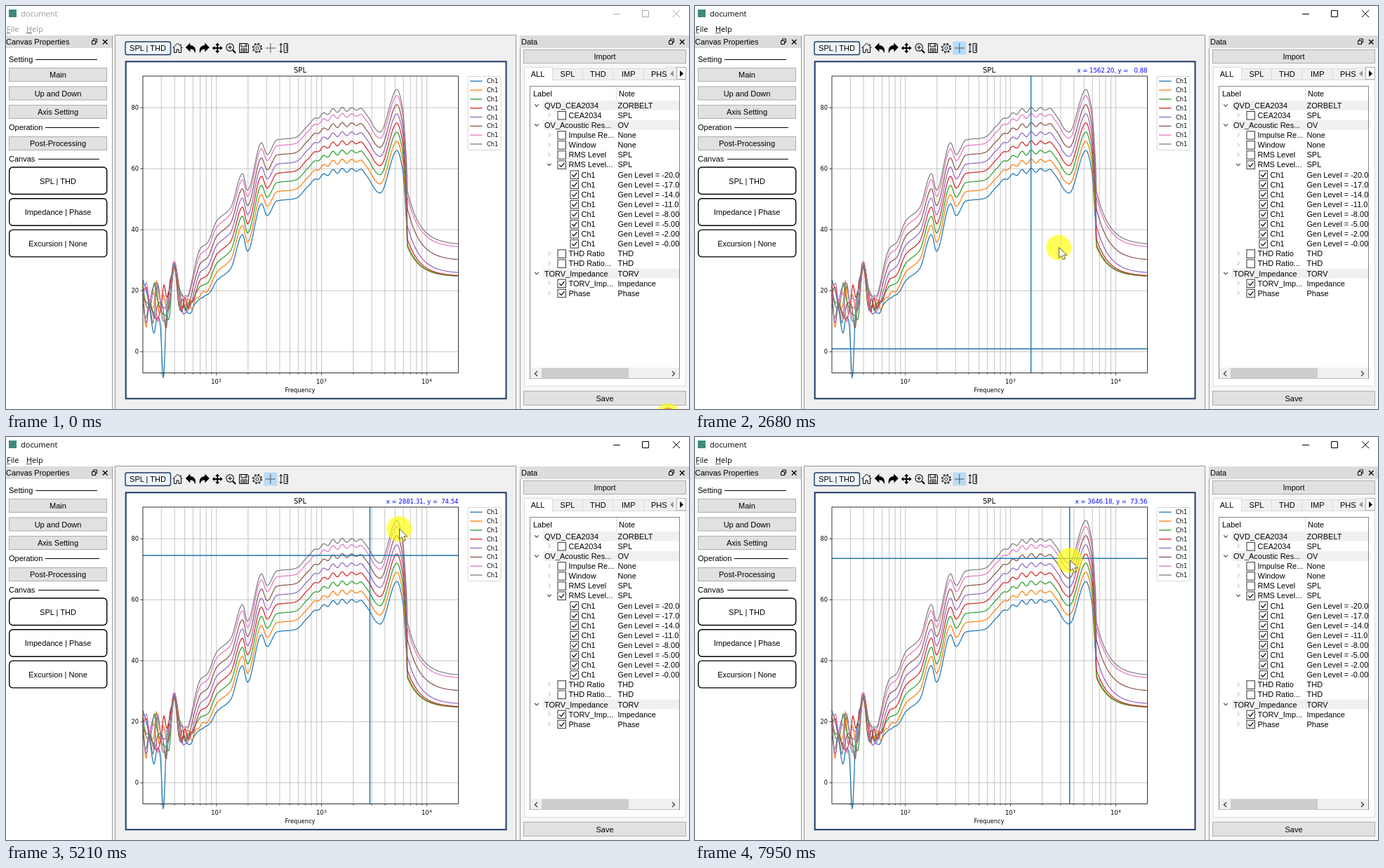
These frames come from a looping animation (973 by 575 pixels, 8 s). An HTML page:

```html
<!DOCTYPE html>
<html lang="en">
<head>
<meta charset="utf-8">
<title>document</title>
<style>
html, body { margin: 0; width: 100%; height: 100%; overflow: hidden; background: #fff; }
svg { display: block; }
text { font: 11px "Liberation Sans", Arial, sans-serif; fill: #000; white-space: pre; }
.win { font: 11px "Open Sans", sans-serif; fill: inherit; }
.plot { font: 8.3px "DejaVu Sans", sans-serif; }
.mid { text-anchor: middle; }
.end { text-anchor: end; }
</style>
</head>
<body>
<svg id="stage" width="973" height="575" viewBox="0 0 973 575"></svg>
<script>
const LOOP = 8000;
const AX = { l: 195, r: 644.5, t: 100, b: 523.5 };
const COLORS = ['#1f77b4', '#ff7f0e', '#2ca02c', '#d62728', '#9467bd', '#8c564b', '#e377c2', '#7f7f7f'];
const DB = 4.35;
const xPos = f => AX.l + Math.log10(f / 20) * (AX.r - AX.l) / 3;
const yPos = v => 493.2 - v * DB;
const drop = i => Math.max(0, 20 - 3 * i); // level below full scale, dB

const rect = (x, y, w, h, fill, stroke = 'none', more = '') =>
  `<rect x="${x}" y="${y}" width="${w}" height="${h}" fill="${fill}" stroke="${stroke}" ${more}/>`;
const line = (x1, y1, x2, y2, stroke = '#000', w = 1) =>
  `<path d="M${x1} ${y1}L${x2} ${y2}" stroke="${stroke}" stroke-width="${w}"/>`;
const text = (x, y, s, cls = '', more = '') => `<text x="${x}" y="${y}" class="${cls}" ${more}>${s}</text>`;
const path = (d, w = 1, stroke = '#000', fill = 'none') =>
  `<path d="${d}" fill="${fill}" stroke="${stroke}" stroke-width="${w}"/>`;
const at = (x, y, s) => `<g transform="translate(${x} ${y})">${s}</g>`;
const button = (x, y, w, h, s) =>
  rect(x + .5, y + .5, w - 1, h - 1, '#e1e1e1', '#adadad') + text(x + w / 2, y + h / 2 + 4.2, s, 'mid');

// Window frame
function windowBar() {
  return `<g id="bar">${text(21, 15, 'document', 'win')}${text(1, 37, 'File', 'win')}${text(29, 37, 'Help', 'win')}</g>
    <g id="ctl" fill="none">${path('M865 11.5h10M906.5 6.5h9v9h-9zM950 6l10 10M960 6l-10 10', 1, 'inherit')}</g>`
    + rect(4, 5, 11, 11, '#3f8a7c') + line(1, 38.5, 6, 38.5, '#555') + line(29, 38.5, 37, 38.5, '#555');
}

function dockHead(x, w, s) {
  const r = x + w;
  return rect(x, 42, w, 18, '#dcdcdc') + text(x + (x ? 2 : 0), 55, s)
    + path(`M${r - 28.5} 49.5h5v5h-5zM${r - 26.5} 49v-2h5v5h-2`)
    + path(`M${r - 13} 48l6.5 6.5m0-6.5l-6.5 6.5`, 1.4);
}

function leftPanel() {
  let s = dockHead(0, 151, 'Canvas Properties');
  [['Setting', 76, 42, 130], ['Operation', 173, 56, 133], ['Canvas', 218, 46, 133]].forEach(([n, y, a, b]) => {
    s += text(4, y + 4, n) + line(a, y + .5, b, y + .5, '#000', 1.2);
  });
  [['Main', 88], ['Up and Down', 114.5], ['Axis Setting', 141], ['Post-Processing', 186]].forEach(([n, y]) => {
    s += button(4, y, 140, 20, n);
  });
  ['SPL | THD', 'Impedance | Phase', 'Excursion | None'].forEach((n, i) => {
    const y = 230 + i * 44.7;
    s += rect(4.7, y, 139, 38.5, '#fff', '#000', 'rx="5" stroke-width="1.4"') + text(74, y + 23.7, n, 'mid');
  });
  return s;
}

// Toolbar
function toolbar() {
  const turn = 'M-7.5 -1L-1 -7.5V-4C5 -4 8 1 6 7.5C5 3 3 1.5 -1 1.5V5.5Z';
  const move = 'M0 -7.5L3 -4H1V-1H4V-3L7.5 0L4 3V1H1V4H3L0 7.5L-3 4H-1V1H-4V3L-7.5 0L-4 -3V-1H-1V-4H-3Z';
  const ring = (r, more = '') => `<circle r="${r}" fill="none" stroke="#222" ${more}/>`;
  const icons = [
    path('M-7 0L0 -7L7 0M-5 -1.5V6.5H-1.5V2H1.5V6.5H5V-1.5M4.5 -3V-6'),
    path(turn, 0, 'none', '#000'),
    `<g transform="scale(-1 1)">${path(turn, 0, 'none', '#000')}</g>`,
    path(move, 0, 'none', '#000'),
    at(-1, -1, ring(5.3, 'stroke-width="1.2"') + path('M-3 0H3M0 -3V3') + path('M4 4L8 8', 2)),
    path('M-6.5 -6.5H5L6.5 -5V6.5H-6.5ZM-4 -6.5V-2H4V-6.5M-4 6.5V1H4V6.5M-2.5 3H2.5M-2.5 4.8H2.5M2 -5.5V-3'),
    ring(5) + ring(6.4, 'stroke-width="1.6" stroke-dasharray="2.5 2.53"') + ring(2.1),
    '<rect id="hot" x="-9.5" y="-9.5" width="19" height="19" fill="#b9dcf5"/>' + path('M-7 0H7M0 -7V7', 1, '#555'),
    path('M-4 -6V6M-6 -4L-4 -6.5L-2 -4M-6 4L-4 6.5L-2 4M.5 -6.5H5.5V6.5H.5ZM3 -4H5.5M3 -1.5H5.5M3 1H5.5M3 3.5H5.5')
  ];
  return rect(170, 51, 64.5, 18.5, '#eef5fb', '#1c3a63', 'rx="2.5" stroke-width="1.4"')
    + text(202, 64, 'SPL | THD', 'mid') + icons.map((s, i) => at(244.5 + i * 18.9, 60, s)).join('');
}

// Curves: turning points of the loudest sweep
const SHAPE = [[195, 600], [258, 425], [277, 346], [287, 338], [300, 307], [320, 288], [337, 239], [344, 263],
  [364, 195], [372, 212], [386, 191], [411, 188], [440, 161], [475, 148], [505, 147], [533, 180],
  [557, 119], [565, 146], [571, 228]];

const bump = (x, mid, w) => Math.exp(-(((x - mid) / w) ** 2));
const sigmoid = u => 1 / (1 + Math.exp(-u));
const powerSum = (a, b, k = 18.9) => Math.min(a, b) - k * Math.log1p(Math.exp(-Math.abs(a - b) / k));

// Cubic through the points that never overshoots
function spline(p, x) {
  const k = Math.max(0, p.findIndex(q => q[0] >= x) - 1);
  const sec = j => p[j + 1] && p[j] ? (p[j + 1][1] - p[j][1]) / (p[j + 1][0] - p[j][0]) : sec(j < 0 ? 0 : j - 1);
  const slope = j => {
    const a = sec(j - 1), b = sec(j);
    return a * b <= 0 ? 0 : 2 * a * b / (a + b);
  };
  const h = p[k + 1][0] - p[k][0], u = (x - p[k][0]) / h, v = 1 - u;
  return p[k][1] * v * v * (1 + 2 * u) + p[k + 1][1] * u * u * (3 - 2 * u)
    + h * u * v * (slope(k) * v - slope(k + 1) * u);
}

function random(seed) {
  return () => (seed = (seed * 16807) % 2147483647) / 2147483647;
}

function noiseKnots(seed) {
  const rnd = random(seed), knots = [];
  for (let x = 195; x < 360; x += 4 + rnd() * 2.5) knots.push([x, rnd() - .5]);
  return knots;
}

function curve(i) {
  const knots = noiseKnots(977 + i * 7919);
  const end = 386 - 46 * sigmoid((i - 5) * 2.2);
  const top = 356 - 73 * sigmoid((i - 4.6) * 1.3);
  const d = [];
  for (let x = AX.l; x <= AX.r; x += 1.2) {
    let y;
    if (x > 571.5) y = end + (top - end) * Math.exp((578 - x) / 18);
    else {
      const ripple = 3.5 * bump(x, 472, 32) * Math.cos((x - 452) / 13.5 * 2 * Math.PI);
      y = spline(SHAPE, x) + drop(i) * DB - ripple;
    }
    if (x < 345) {
      const peak = bump(x, 240, 5.5);
      const amp = 80 * Math.exp(-Math.max(0, x - 225) / 35) * (1 - .75 * peak);
      const dip = i ? 0 : 75 * bump(x, 224, 3);
      const floor = 430 - 62 * peak + dip + spline(knots, x) * amp + Math.max(0, x - 290);
      y = powerSum(y, floor);
    }
    d.push(x.toFixed(1) + ' ' + y.toFixed(1));
  }
  return 'M' + d.join('L');
}

function chart() {
  let s = rect(170.7, 79.3, 541.8, 480.9, '#fff', '#1c3a63', 'stroke-width="2"');
  for (let dec = 10; dec <= 10000; dec *= 10)
    for (let n = 1; n < 10; n++) {
      const f = dec * n, x = xPos(f);
      if (f <= 20 || f >= 20000) continue;
      s += line(x, AX.t, x, AX.b, '#b0b0b0', .75) + line(x, AX.b, x, AX.b + (n === 1 ? 3.5 : 2), '#000', .7);
      if (n === 1) s += text(x - 7.5, 539, '10', 'plot') + text(x + 3.5, 535.5, Math.log10(f), 'plot', 'style="font-size:5.8px"');
    }
  for (let v = 0; v <= 80; v += 20)
    s += line(AX.l, yPos(v), AX.r, yPos(v), '#b0b0b0', .75) + line(AX.l - 3.5, yPos(v), AX.l, yPos(v), '#000', .8)
      + text(189, yPos(v) + 3.2, v, 'plot end');
  s += '<g stroke-linejoin="round">' + COLORS.map((c, i) => path(curve(i), 1.25, c)).join('') + '</g>';
  s += `<g id="cross"><path id="hair" stroke="#1f77b4" stroke-width="1.5"/>
    ${text(644.5, 95.3, '', 'plot end', 'id="read" style="font-size:8.5px;fill:#00f"')}</g>`;
  s += rect(AX.l, AX.t, AX.r - AX.l, AX.b - AX.t, 'none', '#000', 'stroke-width=".8"');
  s += text(419, 94.5, 'SPL', 'plot mid', 'style="font-size:10px"') + text(419, 551, 'Frequency', 'plot mid');
  s += rect(658, 100.5, 47, 105, '#fff', '#ccc', 'rx="2" stroke-width=".8"');
  COLORS.forEach((c, i) => {
    const y = 107.2 + i * 12.83;
    s += line(661, y, 678.5, y, c, 1.3) + text(685, y + 3, 'Ch1', 'plot');
  });
  return s;
}

// Data dock; rows are depth, label, note, box state (- none, 0 off, 1 on), open
const ROWS = [
  [0, 'QVD_CEA2034', 'ZORBELT', '-', 1], [1, 'CEA2034', 'SPL', 0],
  [0, 'OV_Acoustic Res...', 'OV', '-', 1], [1, 'Impulse Re...', 'None', 0], [1, 'Window', 'None', 0],
  [1, 'RMS Level', 'SPL', 0], [1, 'RMS Level...', 'SPL', 1, 1],
  ...COLORS.map((c, i) => [2, 'Ch1', 'Gen Level = -' + drop(i).toFixed(2).slice(0, 4), 1]),
  [1, 'THD Ratio', 'THD', 0], [1, 'THD Ratio...', 'THD', 0],
  [0, 'TORV_Impedance', 'TORV', '-', 1], [1, 'TORV_Imp...', 'Impedance', 1], [1, 'Phase', 'Phase', 1]
];

function dataPanel() {
  let s = dockHead(732, 241, 'Data') + button(737, 62, 232, 20, 'Import') + button(737, 549, 232, 21, 'Save');
  s += rect(738.5, 105.5, 230, 437, '#fff', '#dcdcdc') + rect(778.5, 89.5, 190, 16, '#f0f0f0', '#d9d9d9');
  s += rect(738.5, 87.5, 40, 19, '#fff', '#d9d9d9') + line(739, 106, 778, 106, '#fff', 2) + text(757.5, 101, 'ALL', 'mid');
  ['SPL', 'THD', 'IMP', 'PHS'].forEach((n, i) => {
    s += text(800 + i * 43.4, 101, n, 'mid') + line(821.5 + i * 43.4, 90, 821.5 + i * 43.4, 105, '#d9d9d9');
  });
  s += rect(941.5, 87.5, 13, 17, '#f0f0f0', '#e3e3e3') + path('M951 92v9l-5-4.5z', 0, 'none', '#999');
  s += rect(955.5, 87.5, 13, 17, '#fafafa', '#b5b5b5') + path('M960 92v9l5-4.5z', 0, 'none', '#000');
  s += rect(746.5, 114.5, 213, 417, '#fff', '#828790');
  s += text(751, 129, 'Label') + text(873, 129, 'Note') + line(869.5, 115, 869.5, 134, '#dcdcdc');
  ROWS.forEach(([depth, label, note, box, open], i) => {
    const y = 141.8 + i * 14.1, x = 756 + depth * 18;
    if (!depth) s += rect(765, y - 7, 194, 14, '#f0f0f0');
    if (depth < 2) s += open ? path(`M${x - 2.8} ${y - 1.5}l2.8 2.8l2.8 -2.8`, 1.1, '#444') : path(`M${x - 1.3} ${y - 3}l2.8 2.8l-2.8 2.8`, 1, '#aaa');
    if (box !== '-') {
      s += rect(x + 12, y - 5.5, 11.5, 11.5, '#fff', '#333');
      if (box) s += path(`M${x + 14.3} ${y + .2}l2.6 2.8l4.6 -5.6`, 1.2);
    }
    s += text(depth ? x + 27.5 : 767, y + 4, label) + text(871.5, y + 4, note);
  });
  s += rect(747, 516, 212, 15.5, '#f0f0f0') + rect(763, 516.5, 124, 15, '#cdcdcd');
  return s + path('M757 521l-3.5 3.5l3.5 3.5M949 521l3.5 3.5l-3.5 3.5', 1.4, '#444');
}

document.getElementById('stage').innerHTML =
  rect(0, 0, 973, 575, '#fff') + windowBar() + leftPanel()
  + rect(151, 42, 5, 533, '#f5f5f5') + line(151.5, 42, 151.5, 575, '#999') + rect(155.5, 41.5, 571, 540, '#f0f0f0', '#999')
  + rect(727, 42, 5, 533, '#f5f5f5') + rect(732, 60, 241, 515, '#f7f7f7') + line(732.5, 42, 732.5, 575, '#999')
  + toolbar() + chart() + dataPanel()
  + `<circle id="halo" r="18" fill="#ff0" opacity=".66"/><circle id="click" r="12" fill="#f00"/>
     <path id="arrow" d="M0 0V15L3.5 11.8L6 17.5L8.6 16.4L6.2 10.8H11Z" fill="#fff" stroke="#444" stroke-width=".9"/>`;

const [bar, ctl, hot, cross, hair, read, halo, click, arrow] =
  ['bar', 'ctl', 'hot', 'cross', 'hair', 'read', 'halo', 'click', 'arrow'].map(id => document.getElementById(id));

// Time, then place of the pointer or value under the crosshair
const POINTER = [[60, 943, 585], [200, 530, 257], [380, 530, 257], [900, 348, 26], [1130, 382, 65], [2200, 382, 65],
  [2550, 533, 300], [2950, 474, 477], [3440, 477, 486], [3840, 479, 488], [4400, 517, 179], [5210, 560, 131],
  [6390, 556, 121], [7950, 534, 176]];
const VALUE = [[3840, 1562.2, .88], [4400, 2827.53, 70.88], [5210, 2881.3, 74.54], [6390, 5415.25, 86.38], [7950, 3646.18, 73.56]];

function track(keys, t) {
  const k = keys.findIndex(q => q[0] > t);
  if (k < 0) return keys[keys.length - 1].slice(1);
  if (!k) return keys[0].slice(1);
  const a = keys[k - 1], b = keys[k];
  let u = (t - a[0]) / (b[0] - a[0]);
  u = u * u * (3 - 2 * u);
  return [a[1] + (b[1] - a[1]) * u, a[2] + (b[2] - a[2]) * u];
}

// Press marks: from, to, place, strength
const PRESSES = [[0, 70, 943, 585, .4], [1810, 2210, 382, 65, .6], [3640, 5000, 479, 488, .5]];

function draw(t) {
  const active = t >= 1940;
  bar.setAttribute('fill', active ? '#000' : '#999');
  ctl.setAttribute('stroke', active ? '#000' : '#aaa');
  hot.setAttribute('opacity', t >= 1200 ? 1 : 0);

  const [x, y] = track(POINTER, t);
  halo.setAttribute('transform', `translate(${x} ${y})`);
  arrow.setAttribute('transform', `translate(${x + .5} ${y})`);

  const press = PRESSES.find(([a, b]) => t >= a && t < b) || [0, 0, 0, 0, 0];
  click.setAttribute('transform', `translate(${press[2]} ${press[3]})`);
  click.setAttribute('opacity', press[4]);

  cross.setAttribute('display', t >= 2060 ? 'inline' : 'none');
  const [f, v] = track(VALUE, t);
  hair.setAttribute('d', `M${xPos(f)} ${AX.t}V${AX.b}M${AX.l} ${yPos(v)}H${AX.r}`);
  read.textContent = `x = ${f.toFixed(2)}, y = ${v.toFixed(2).padStart(6)}`;
}

const start = performance.now();
function tick() {
  draw((performance.now() - start) % LOOP);
  requestAnimationFrame(tick);
}
tick();
</script>
</body>
</html>
```
